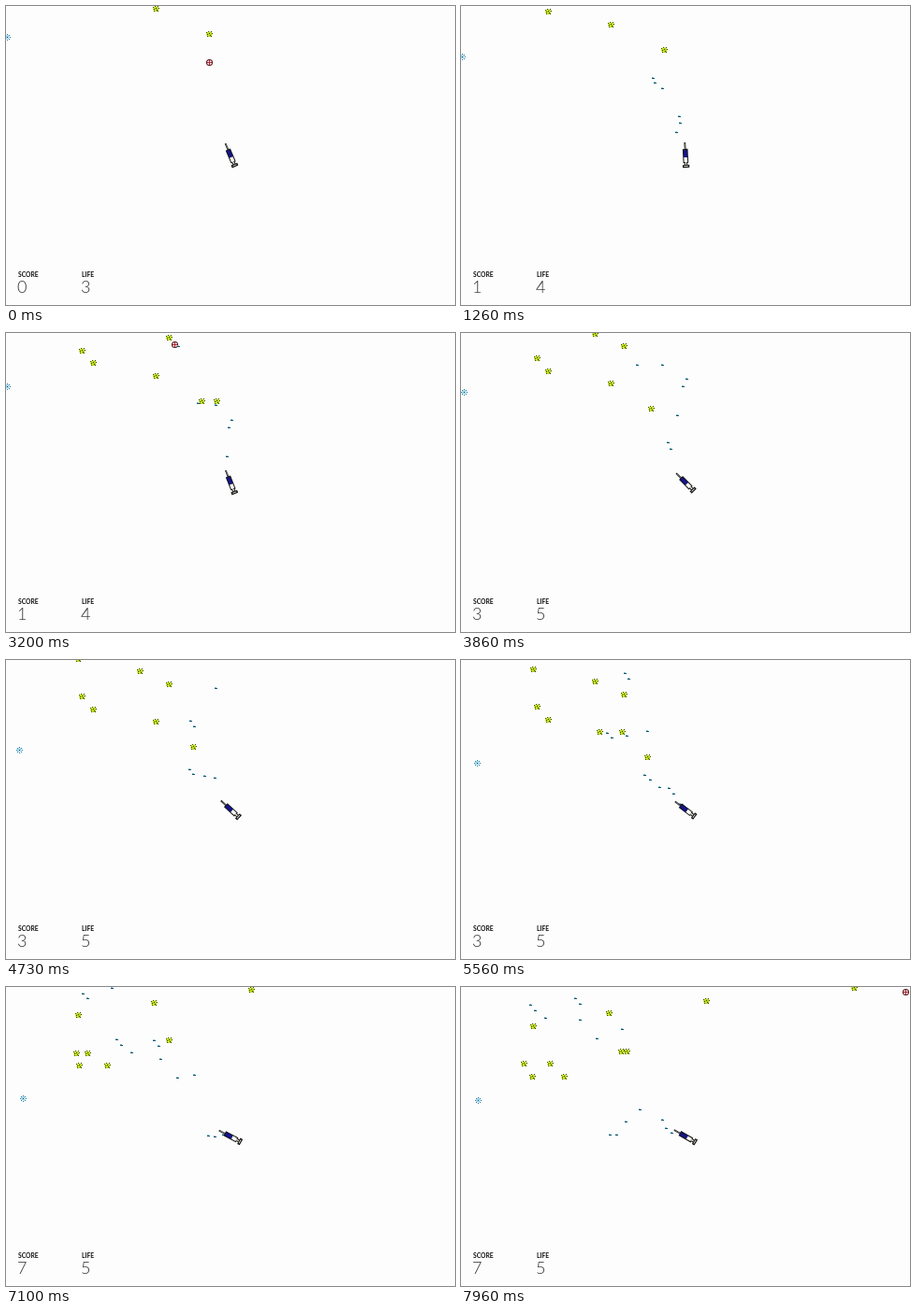
An HTML page with a canvas that plays this animation: 480x320 px, repeating every 8 s.

```html
<!DOCTYPE html>
<html lang="en">
<head>
<meta charset="utf-8">
<style>
  html, body { margin: 0; width: 100%; height: 100%; overflow: hidden; background: #fefdfe; }
  canvas { display: block; width: 480px; height: 320px; }
</style>
</head>
<body>
<canvas id="stage" width="480" height="320"></canvas>
<script>
const ctx = document.getElementById('stage').getContext('2d');
const LOOP = 8000;
const GUN = { x: 240, y: 160 };
const FALL = 1 / 75;           // px per ms
const SHOT_SPEED = 1 / 15;
const MUZZLE = 6;
const SPAWN_GAP = 1012;
const DIVIDE_AGE = 5040;

// [time, angle in degrees left of straight up]
const shots = [
  [0, 22.9], [82, 22.7], [207, 19], [717, 9.8], [823, 9.9], [946, 21.1],
  [1906, 22.4], [2022, 11.2], [2285, -0.5], [2405, 1.7], [2861, 7.1],
  [3253, 24], [3360, 23.5], [3892, 45.9], [3997, 46], [4138, 38.6], [4248, 26],
  [4785, 49.6], [4901, 50], [5105, 49.7], [5215, 38.5], [5333, 38.4], [5523, 42.1],
  [5926, 42.1], [6046, 30.6], [6835, 88.6], [6940, 88.5], [7060, 76],
  [7196, 59.4], [7588, 54.2], [7708, 66.8], [7818, 75]
];
// Aim at moments without a shot
const aims = [[1260, 3], [2560, 16], [3860, 45], [5570, 55], [7100, 62], [7960, 60], [8000, 60]];
const poses = shots.concat(aims).sort((a, b) => a[0] - b[0]);

// slot: place in the spawn rhythm; gone: end times of the left and right half
const viruses = [
  { x: 217, slot: -2, gone: [6630, 3840] },
  { x: 160, slot: 0, gone: [5595, 5630] },
  { x: 93, slot: 1 },
  { x: 81, slot: 2 },
  { x: 174, slot: 3 },
  { x: 143, slot: 4, gone: [6330, 6330] },
  { x: 77, slot: 5 },
  { x: 158, slot: 6 },
  { x: 262, slot: 7 },
  { x: 420, slot: 8 }
];
const kits = [
  { x: 217, born: -2250, gone: 1200 },
  { x: 180, born: 2760, gone: 3280 },
  { x: 475, born: 7775, gone: LOOP }
];
const scoreTimes = [1200, 3280, 3840, 5595, 5630, 6330, 6630];
const lifeTimes = [1200, 3280];

const rad = deg => deg * Math.PI / 180;
const countPast = (times, t) => times.filter(m => t >= m).length;
const settle = (from, to, rate, ms) => to - (to - from) * Math.exp(-rate * ms / 1000);

function rect(x, y, w, h, color) {
  ctx.fillStyle = color;
  ctx.fillRect(x, y, w, h);
}

function disc(x, y, r, color) {
  ctx.fillStyle = color;
  ctx.beginPath();
  ctx.arc(x, y, r, 0, Math.PI * 2);
  ctx.fill();
}

function at(x, y, draw) {
  ctx.save();
  ctx.translate(Math.round(x), Math.round(y));
  draw();
  ctx.restore();
}

function aimAt(t) {
  const i = poses.findIndex(p => p[0] > t);
  if (i < 1) return poses[0][1];
  const [t0, a] = poses[i - 1], [t1, b] = poses[i];
  return a + (b - a) * (t - t0) / (t1 - t0);
}

function drawVirus() {
  disc(0.3, 0.2, 2.8, '#b4d619');
  for (const [x, y] of [[-3, -2], [-1, -3], [2, -3], [3, -1], [-2, 0], [0, -1], [1, 1], [-2, 2], [2, 2]])
    rect(x, y, 1, 1, '#3d4a08');
  rect(-1, -2, 1, 1, '#e8f23c');
  rect(-1, 1, 1, 1, '#e8f23c');
}

function drawBlueVirus() {
  disc(0.3, 0.3, 2.3, '#9fd4e6');
  for (let i = 0; i < 8; i++) {
    const a = i * Math.PI / 4;
    rect(Math.round(Math.cos(a) * 2.6), Math.round(Math.sin(a) * 2.6), 1, 1, '#287fa3');
  }
  rect(0, 0, 1, 1, '#1c5877');
}

function drawKit() {
  disc(0.5, 0.5, 3.5, '#4c1218');
  disc(0.5, 0.5, 2.5, '#fff1f1');
  rect(0, -2, 1, 5, '#b52430');
  rect(-2, 0, 5, 1, '#b52430');
}

function drawShot() {
  rect(-1, 0, 3, 1, '#14506e');
  rect(-1, -1, 2, 1, '#7fc4cf');
}

function drawSyringe(angle) {
  ctx.save();
  ctx.translate(GUN.x, GUN.y);
  ctx.rotate(-rad(angle));
  rect(-0.9, -14, 1.8, 8, '#222');
  rect(-0.2, -13, 0.6, 6, '#8a8f8a');
  rect(-2.8, -7, 5.6, 15, '#111');
  rect(-1.8, -6, 3.6, 8, '#14148c');
  rect(-1.8, 2, 3.6, 5, '#fcfcf4');
  rect(-1.6, 8, 3.2, 3, '#111');
  rect(-0.6, 7, 1.2, 4, '#f4f4ea');
  rect(-3.6, 10, 7.2, 3, '#111');
  rect(-2.2, 11, 4.4, 0.9, '#dfe3cf');
  ctx.restore();
}

function drawViruses(t) {
  for (const { x, slot, gone = [LOOP, LOOP] } of viruses) {
    const age = t - (slot * SPAWN_GAP - 225);
    const gap = settle(0, 18, 1.4, Math.max(0, age - DIVIDE_AGE));
    [-1, 1].forEach((side, i) => {
      if (t < gone[i]) at(x + side * gap, age * FALL, drawVirus);
    });
  }
}

function blueSpot(t) {
  const late = t - 3765;
  return late < 0
    ? [1, settle(33, 57.5, 1.55, t)]
    : [settle(1, 18, 1.5, late), settle(57.5, 122.3, 0.92, late)];
}

function drawStat(label, value, x) {
  ctx.fillStyle = '#111';
  ctx.font = '700 6.7px Lato, sans-serif';
  ctx.fillText(label, x, 290);
  ctx.fillStyle = '#333';
  ctx.font = '300 18px Lato, sans-serif';
  ctx.fillText(value, x - 1, 307);
}

function render(t) {
  rect(0, 0, 480, 320, '#fefdfe');
  for (const k of kits)
    if (t < k.gone) at(k.x, (t - k.born) * FALL * 2, drawKit);
  drawViruses(t);
  at(...blueSpot(t), drawBlueVirus);
  for (const [born, angle] of shots) {
    if (t < born) continue;
    const r = MUZZLE + (t - born) * SHOT_SPEED;
    at(GUN.x - Math.sin(rad(angle)) * r, GUN.y - Math.cos(rad(angle)) * r, drawShot);
  }
  drawSyringe(aimAt(t));
  drawStat('SCORE', countPast(scoreTimes, t), 13);
  drawStat('LIFE', 3 + countPast(lifeTimes, t), 81);
}

const start = performance.now();
function tick() {
  render((performance.now() - start) % LOOP);
  requestAnimationFrame(tick);
}
tick();
</script>
</body>
</html>
```
